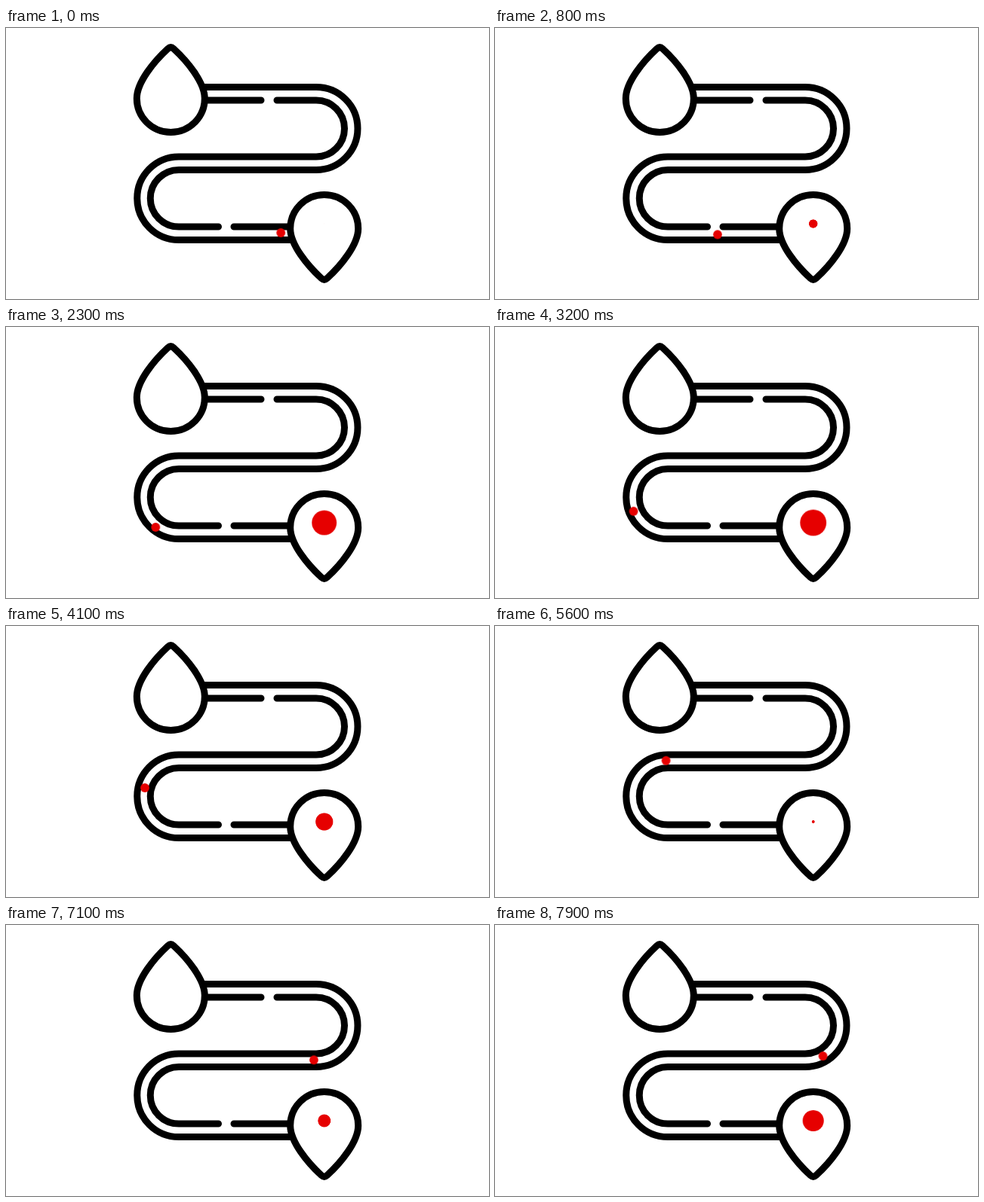
An HTML page without scripts for the animation above (8 s loop, 640 by 360 pixels).

```html
<!DOCTYPE html>
<html lang="en">
<head>
<meta charset="utf-8">
<title>Route between two pins</title>
<style>
  html, body { margin: 0; width: 100%; height: 100%; overflow: hidden; background: #fff; }
  svg { display: block; width: 100vw; height: 100vh; }
  .ink { fill: none; stroke: #000; stroke-width: 9; stroke-linecap: round; stroke-linejoin: round; }
  .pin { fill: #fff; }
  .red { fill: #e60000; }
  .walker { animation: walk 8s linear infinite; }
  .pulse { animation: pulse 8s linear infinite; }

  /* quick on the straights, slow in the bends */
  @keyframes walk {
    0%     { transform: translate(365.7px, 272px); }
    10%    { transform: translate(295px, 274.4px); }
    21.25% { transform: translate(215px, 274.8px); }
    28.75% { transform: translate(198.3px, 266px); }
    33.75% { transform: translate(189.4px, 257px); }
    40%    { transform: translate(183.6px, 244.8px); }
    45%    { transform: translate(182.3px, 232.3px); }
    48.75% { transform: translate(182.6px, 222px); }
    51.25% { transform: translate(184px, 215px); }
    56.25% { transform: translate(188.4px, 202.4px); }
    62.5%  { transform: translate(198.6px, 190.5px); }
    67.5%  { transform: translate(211.3px, 182.4px); }
    68.75% { transform: translate(213.8px, 178.7px); }
    80%    { transform: translate(328px, 179.4px); }
    87.5%  { transform: translate(404.5px, 179.6px); }
    93.75% { transform: translate(421.5px, 178.2px); }
    98.75% { transform: translate(434.5px, 174.1px); }
    100%   { transform: translate(437.4px, 172.8px); }
  }

  @keyframes pulse {
    0%     { transform: scale(0); }
    35%    { transform: scale(1); }
    73.75% { transform: scale(0); }
    100%   { transform: scale(.737); }
  }
</style>
</head>
<body>
<svg viewBox="0 0 640 360">
  <defs>
    <path id="pin" d="M214.5 27.5Q218.3 24 222.1 27.5C240 44 263.3 72 263.3 93.6A45 45 0 0 1 173.3 93.6C173.3 72 196.6 44 214.5 27.5Z"/>
  </defs>
  <g class="ink">
    <path d="M262 78.5H411A55 55 0 0 1 411 188.5H229A37.75 37.75 0 0 0 229 264H281.5"/>
    <path d="M359 96H411A37.5 37.5 0 0 1 411 171H229A55.25 55.25 0 0 0 229 281.5H378"/>
    <path d="M262 96H338M302 264H378"/>
    <use class="pin" href="#pin"/>
    <use class="pin" href="#pin" transform="rotate(180 320 180)"/>
  </g>
  <g class="red">
    <g transform="translate(421.7 260)"><circle class="pulse" r="20"/></g>
    <circle class="walker" r="5.9"/>
  </g>
</svg>
</body>
</html>
```
